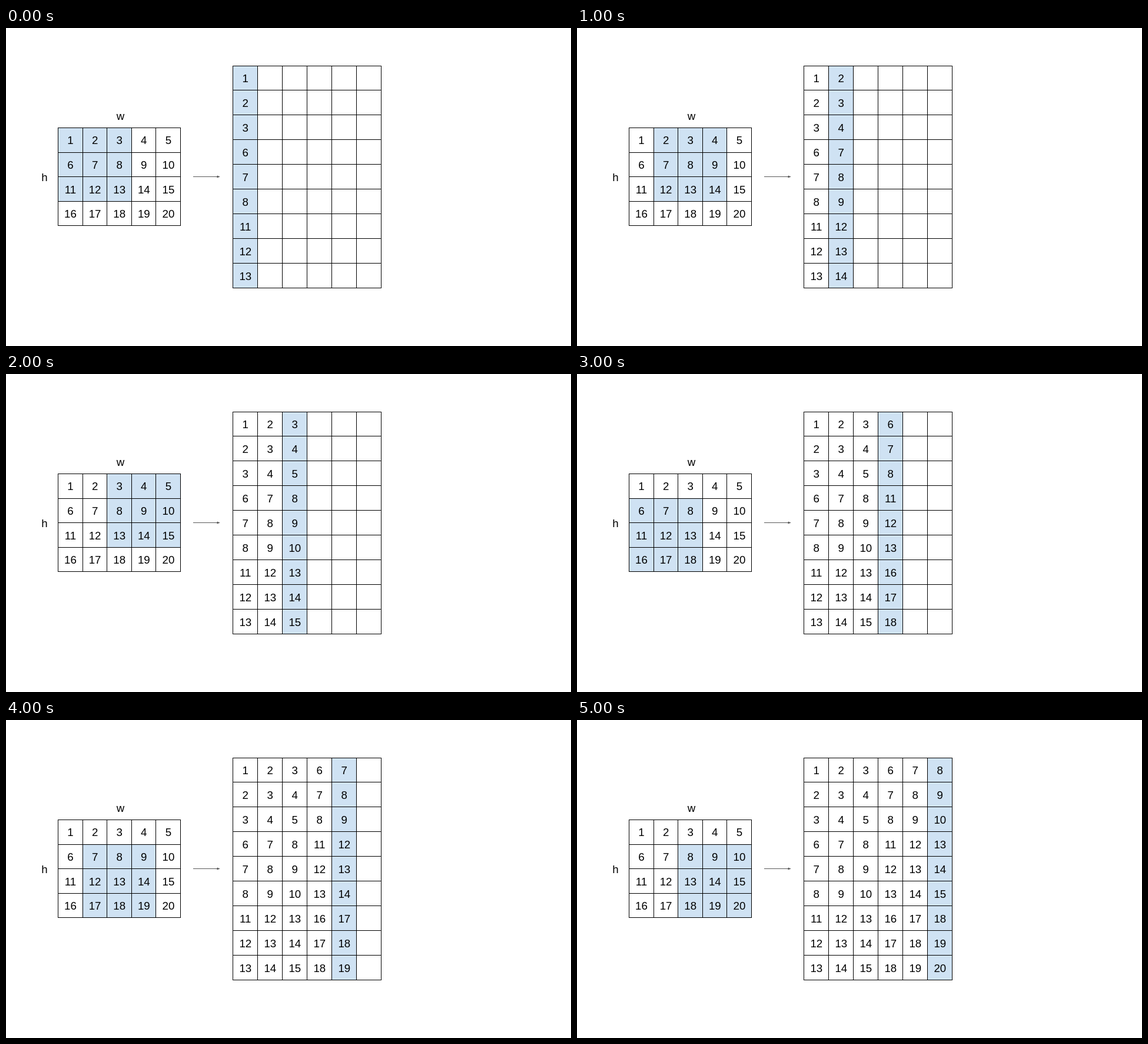
Write an HTML page that moves like this. It is 960 by 540 pixels and loops after 6 s.

```html
<!DOCTYPE html>
<html lang="en">
<head>
<meta charset="utf-8">
<title>Sliding window to columns</title>
<style>
  html, body { margin: 0; width: 100%; height: 100%; overflow: hidden; background: #fff; }
  svg { display: block; width: 960px; height: 540px; }
  text { font: 18.67px "Liberation Sans", Arial, sans-serif; text-anchor: middle; fill: #000; }
  .mark { fill: #cfe2f3; }
  .cover { fill: #fff; }
  .lines { fill: #000; shape-rendering: crispEdges; }
  .window { animation: window 6s step-end infinite; }
  .column { animation: column 6s steps(6) infinite; }
  @keyframes window {
    0% { transform: translate(0, 0); }
    16.6667% { transform: translate(41.6px, 0); }
    33.3333% { transform: translate(83.2px, 0); }
    50% { transform: translate(0, 41.6px); }
    66.6667% { transform: translate(41.6px, 41.6px); }
    83.3333% { transform: translate(83.2px, 41.6px); }
  }
  @keyframes column {
    to { transform: translateX(252px); }
  }
</style>
</head>
<body>
<svg viewBox="0 0 960 540">
  <rect class="mark window" x="88.5" y="169.5" width="124.8" height="124.8"/>
  <rect class="mark column" x="385.5" y="64.5" width="42" height="377"/>
  <g id="numbers"></g>
  <rect class="cover column" x="427.5" y="64.5" width="210" height="377"/>
  <g id="lines" class="lines"></g>
  <text x="194.5" y="156">w</text>
  <text x="65.5" y="259.5">h</text>
  <path d="M318 252.5H359" stroke="#595959"/>
  <path d="M358.5 250.6L363.8 252.5L358.5 254.4Z" fill="#595959"/>
</svg>
<script>
  const numbers = document.getElementById('numbers');
  const lines = document.getElementById('lines');

  function add(parent, tag, attrs, content = '') {
    const node = document.createElementNS(parent.namespaceURI, tag);
    for (const key in attrs) node.setAttribute(key, attrs[key]);
    node.textContent = content;
    parent.append(node);
  }

  function drawGrid({ x, y, cols, rows, stepX, stepY, textX, textY, value }) {
    const lineX = c => Math.round(x + c * stepX);
    const lineY = r => Math.round(y + r * stepY);
    const width = lineX(cols) - lineX(0) + 1;
    const height = lineY(rows) - lineY(0) + 1;
    for (let c = 0; c <= cols; c++) add(lines, 'rect', { x: lineX(c), y: lineY(0), width: 1, height });
    for (let r = 0; r <= rows; r++) add(lines, 'rect', { x: lineX(0), y: lineY(r), width, height: 1 });
    for (let r = 0; r < rows; r++) {
      for (let c = 0; c < cols; c++) {
        add(numbers, 'text', { x: textX + c * stepX, y: textY + r * stepY }, value(r, c));
      }
    }
  }

  const cell = (row, col) => row * 5 + col + 1;

  drawGrid({
    x: 88, y: 169, cols: 5, rows: 4, stepX: 41.6, stepY: 41.6,
    textX: 109.5, textY: 197.3, value: cell
  });

  // Each column lists the 3×3 window at one of its 2×3 positions.
  drawGrid({
    x: 385, y: 63.5, cols: 6, rows: 9, stepX: 42, stepY: 41.95,
    textX: 406.8, textY: 92,
    value: (r, c) => cell(Math.floor(r / 3) + Math.floor(c / 3), r % 3 + c % 3)
  });
</script>
</body>
</html>
```
